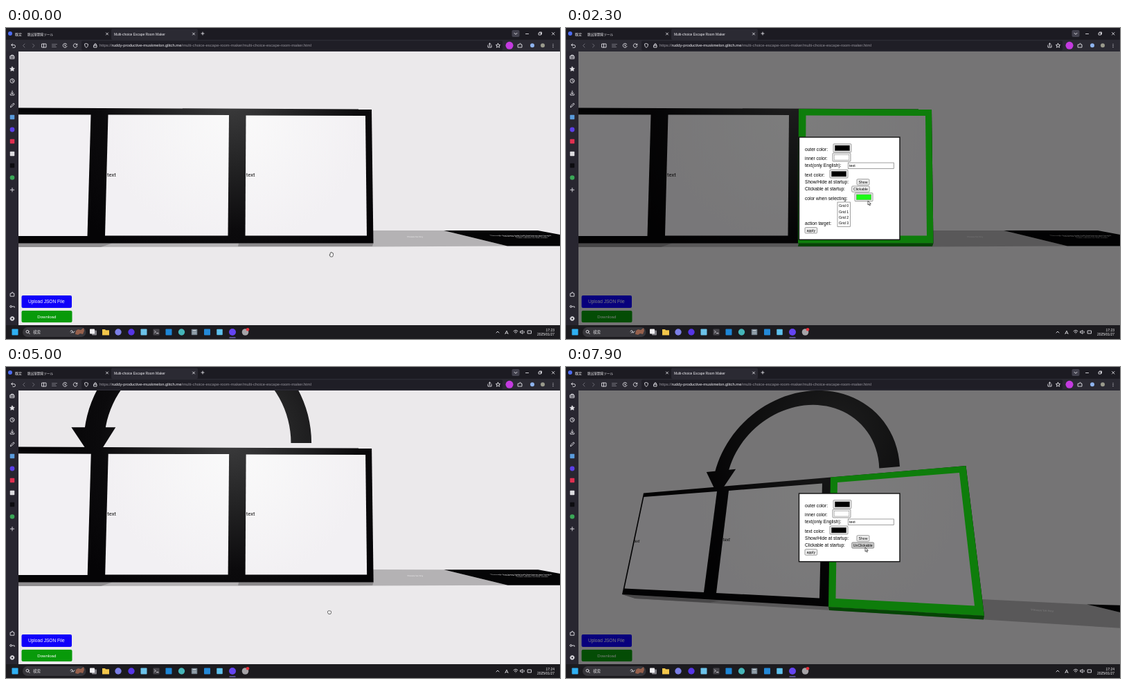
These frames come from a looping animation (800x450 px, 8 s). An HTML page:

```html
<!DOCTYPE html>
<html lang="en">
<head>
<meta charset="utf-8">
<title>Escape room editor</title>
<style>
html, body { margin: 0; width: 100%; height: 100%; overflow: hidden; background: #1c1b22; }
svg { display: block; width: 800px; height: 450px; }
text { font-family: "Liberation Sans", "Noto Sans CJK JP", "Noto Sans CJK", sans-serif; white-space: pre; }
.line { fill: none; stroke: #e4e3e8; stroke-width: .9; stroke-linecap: round; stroke-linejoin: round; }
.faint { stroke: #77757e; }
.ui { font: 6.6px "DejaVu Sans", sans-serif; }
.label { font: 7.6px Roboto, "Liberation Sans", sans-serif; fill: #111; }
.btn rect { fill: #efefef; stroke: #777; stroke-width: .7; }
.btn text { font-size: 5.2px; text-anchor: middle; }
</style>
</head>
<body>
<svg viewBox="0 0 800 450">
  <defs>
    <clipPath id="page"><rect x="18" y="34" width="782" height="396"/></clipPath>
    <radialGradient id="dark" gradientUnits="userSpaceOnUse" cx="0" cy="0" r="270">
      <stop offset="0" stop-color="#3c3c3d"/><stop offset=".35" stop-color="#232324"/>
      <stop offset=".7" stop-color="#0b0a0c"/><stop offset="1" stop-color="#050406"/>
    </radialGradient>
    <radialGradient id="light" gradientUnits="userSpaceOnUse" cx="0" cy="0" r="190">
      <stop offset="0" stop-color="#fafafa"/><stop offset="1" stop-color="#f2f0f3"/>
    </radialGradient>
  </defs>

  <g clip-path="url(#page)">
    <rect x="18" y="34" width="782" height="396" fill="#ebe9eb"/>
    <g id="scene"></g>
    <g class="ui" fill="#fff" text-anchor="middle">
      <rect x="22.5" y="387" width="72.5" height="18" rx="2" fill="#1000fa"/>
      <text x="58.3" y="398.2">Upload JSON File</text>
      <rect x="22.5" y="409" width="73" height="17" rx="2" fill="#089a0a"/>
      <text x="58.8" y="420" font-size="6.1">Download</text>
    </g>
    <rect id="dim" x="18" y="34" width="782" height="396" opacity=".5"/>
  </g>

  <g id="modal" class="ui">
    <rect id="box" x="336.5" width="145.5" fill="#fff" stroke="#111" stroke-width="1.4"/>
    <g id="fields">
      <text x="345" y="203">outer color:</text>
      <text x="345" y="216.3">inner color:</text>
      <text x="345" y="226.3">text(only English):</text>
      <rect x="407.3" y="220" width="66" height="8.4" fill="#fff" stroke="#777" stroke-width=".7"/>
      <text x="409" y="226.2" font-size="5.2" style="font-family:'Liberation Sans',sans-serif;font-size:5.4px">text</text>
      <text x="345" y="240">text color:</text>
      <text x="345" y="250">Show/Hide at startup:</text>
      <text x="345" y="260">Clickable at startup:</text>
    </g>
    <g id="extra">
      <text x="345" y="248.5">color when selecting:</text>
      <text x="345" y="284.6">action target:</text>
      <rect x="392" y="252" width="18.5" height="35.3" fill="#fff" stroke="#777" stroke-width=".7"/>
      <rect id="pick" x="392.5" y="252.7" width="17.5" height="8.3" fill="#cecece"/>
    </g>
    <g id="apply" class="btn"></g>
  </g>

  <g id="chrome">
    <rect width="800" height="17" fill="#1c1b22"/>
    <rect y="17" width="800" height="17" fill="#2b2a33"/>
    <rect x="152" y="1.5" width="125" height="15.5" rx="2" fill="#2b2a33"/>
    <rect x="109" y="18.5" width="608" height="14" rx="2" fill="#1f1e26"/>
    <rect y="34" width="18" height="396" fill="#282630"/>
    <rect y="430" width="800" height="20" fill="#1c1b1f"/>
    <g fill="#f2f1f5" font-size="4.95">
      <text x="13" y="10.5">既定</text>
      <text x="31" y="10.6" font-size="4.65">脱出室開発ツール</text>
      <text x="156" y="10.6">Multi-choice Escape Room Maker</text>
      <text x="135" y="27.4" font-size="5.89" fill="#96949c">https://<tspan fill="#f5f4f8">ruddy-productive-muskmelon.glitch.me</tspan>/multi-choice-escape-room-maker/multi-choice-escape-room-maker.html</text>
    </g>
    <rect x="730.5" y="3" width="11" height="10" rx="2" fill="#42414d"/>
    <g class="line">
      <path d="M144.5 7l3 3m0-3l-3 3M269.5 7l3 3m0-3l-3 3M282 8h4m-2-2v4M734 7.3l2 2 2-2M750.5 8.5h4M769.5 7h3v3h-3zm1-1h3v3M788.5 6.5l3.5 3.5m0-3.5l-3.5 3.5"/>
      <path d="M8 24.5h3.5a2 2 0 0 1 0 4H10M9.5 22.7L7.7 24.5l1.8 1.8"/>
      <path class="faint" d="M27 23l-2.5 2.5 2.5 2.5M38.5 23l2.5 2.5-2.5 2.5M66.5 23.5h7m-7 2h5m-5 2h6"/>
      <path d="M52 23h6v5h-6zm2.5 0v5M87.8 23.7a3 3 0 1 0 .2 2.8M85 24v1.7h1.5M102.5 24a2.8 2.8 0 1 0 .3 2.2m0-3.2v1.6h-1.7"/>
      <path d="M116 22.5l2.5 1q0 3.5-2.5 5-2.5-1.5-2.5-5zM127 25h4v3h-4zm.7 0v-1a1.3 1.3 0 0 1 2.6 0v1"/>
      <path d="M696 25v3h5v-3m-2.5 1.5V22m-1.5 1.5l1.5-1.5 1.5 1.5M710.5 22.3l.9 2 2.2.2-1.6 1.5.5 2.2-2-1.2-2 1.2.5-2.2-1.6-1.5 2.2-.2zM739.5 24h2q0-1.7 1-1.7t1 1.7h1.5v4h-5.5z"/>
      <path d="M790 23.2v.1m0 2.1v.1m0 2.1v.1" stroke-width="1.1"/>
    </g>
    <g class="line">
      <path d="M6.2 40.5h5.6v4H6.2zm1.4 0v-1.4h2.8v1.4M6.2 42.5h5.6"/>
      <path d="M9 56.2l1 2 2.2.2-1.6 1.6.5 2.2L9 61l-2.1 1.2.5-2.2-1.6-1.6 2.2-.2z" fill="#e4e3e8"/>
      <path d="M9 74.7v2l1.3.8M12 76.5a3 3 0 1 0-6 0 3 3 0 0 0 6 0M9 91v4.5m-1.8-1.7L9 95.5l1.8-1.7M6.3 95.5v1.6h5.4v-1.6M6.5 114.4l.5-1.8 3.8-3.8 1.3 1.3-3.8 3.8zM9 231.5v5.4m-2.7-2.7h5.4"/>
      <path d="M6.5 384h1.7q0-1.8 1-1.8t1 1.8h1.6v4.2H6.5zM8.5 403a1.4 1.4 0 1 0-2.8 0 1.4 1.4 0 0 0 2.8 0h3.7v1.4"/>
      <circle cx="9" cy="420.5" r="2" stroke-width="1.6"/>
      <circle cx="9" cy="420.5" r="3" stroke-dasharray="1 1.35"/>
    </g>
    <rect x="24" y="433" width="91.5" height="14" rx="7" fill="#37363b"/>
    <circle cx="31" cy="439.3" r="2" class="line"/><path class="line" d="M32.6 440.9l1.6 1.7"/>
    <text x="39" y="442" font-size="5.5" fill="#d8d7da">検索</text>
    <path class="line" d="M93 439q2-3 3 0t3 0m-5 2q2-2 3 0"/>
    <path d="M100 443l1-5 3-2 4 1 4-3 1 4-2 5-4-1-3 2z" fill="#96604c"/>
    <path d="M322.5 448h9" stroke="#8f7cf0" stroke-width="1"/>
    <path class="line" d="M708 441l2-2 2 2M733 438.7q3-3 6 0m-4.7 1.5q1.7-1.7 3.4 0m-1.7 1.6v.1M743 438.8h1.2l1.7-1.5v5.2l-1.7-1.5H743zm5 0q1 1.2 0 2.4M753.5 438h5v4h-5z"/>
    <g fill="#f2f1f4" font-size="5">
      <text x="720.2" y="442.7" font-size="8">A</text>
      <text id="clock" x="792" y="438.6" text-anchor="end"></text>
      <text x="792" y="445.2" text-anchor="end">2025/01/27</text>
    </g>
  </g>

  <g id="cursor" stroke="#222" stroke-width=".7" fill="#fff" stroke-linejoin="round">
    <path id="arrow" d="M0 0v6l1.4-1.2 1 2.2 1-.5-1-2.1h1.9z"/>
    <path id="hand" d="M-3 0l1.1.3v-2.6q.6-.8 1 0v-.9q.6-.8 1.1 0v.3q.7-.7 1.1 0v.7q.7-.5 1.1.1v3l-.9 2.1h-3z"/>
    <path id="fist" d="M-2.4-1.2q.6-1.4 1.4-.8.8-.7 1.4 0 .8-.5 1.3.2.8 0 .8 1v1.5l-.8 1.6h-3l-1.1-1.8z"/>
  </g>
</svg>

<script>
const NS = "http://www.w3.org/2000/svg";
const $ = id => document.getElementById(id);
const LOOP = 8000;

function add(parent, tag, attrs, text) {
  const el = document.createElementNS(NS, tag);
  for (const k in attrs) el.setAttribute(k, attrs[k]);
  if (text) el.textContent = text;
  parent.appendChild(el);
  return el;
}
const show = (el, on) => el.setAttribute("visibility", on ? "visible" : "hidden");
const mix = (a, b, k) => a.map((v, i) => v + (b[i] - v) * k);
const nums = s => s.split(/[ ,]+/).map(Number);

// Every part of the room has its place before and after the camera turn.
const scene = $("scene");
const parts = [];
function poly(fill, before, after) {
  const el = add(scene, "polygon", { fill });
  parts.push({ el, a: nums(before), b: nums(after), attr: "points", wrap: v => v.join(" ") });
  return el;
}
function label(text, before, after, attrs = { class: "label" }) {
  const el = add(scene, "text", attrs, text);
  parts.push({ el, a: nums(before), b: nums(after), attr: "transform", wrap: v => `matrix(${v})` });
}

const ring = add(scene, "path", { fill: "url(#dark)" });
poly("#b4b2b4", "525,293 632,293 724,315.5 530,316.5 -78,317 -78,311",
  "600,336 752,343.5 931,386 604,365.5 100,335 81,329");
poly("#050506", "632,293 768,293 890,315.5 724,315.5", "752,343.5 950,349 1100,395 931,386");
poly("#8f8d8f", "-78,311 153,311.5 137,317 -78,317", "81,329 222,338 208,341 100,335");
const under = poly("#8b898b", "336,311.5 530.5,311.5 529,316 335,316", "379,347 604,360 603,365.5 380,352");
poly("url(#dark)", "-78,115 528,117.5 530.5,311.5 -78,311.5", "112,182.5 577.5,143 604,360 81,329");
const frame = poly("#1cfb16", "336,117 528,117.5 530.5,311.5 335,311.5", "382,159.5 577.5,143 604,360 379,347");
poly("url(#light)", "-68,125 122.5,125.5 117.5,301 -72,301", "112.5,188 218,180 199,326 84.5,320.5");
poly("url(#light)", "147.5,125.5 322,126 320.5,300.5 143,300.5", "235,179 370,168.5 366,334.5 217,327");
poly("url(#light)", "346.5,126.5 519,127 521,300.5 345.5,300.5", "392,167 568,153 590,345.5 389.5,335");
label("text", "1 0 0 1 -70 215", ".64 -.01 -.14 .8 98 254");
label("text", "1 0 0 1 146 215", ".8 0 -.1 .87 226.5 251.5");
label("text", "1 0 0 1 346.7 215", ".94 0 0 1 391.6 248.5");
const tiny = { fill: "#f4f3f4", "font-size": 4, "text-anchor": "middle" };
label("Please be tiny", ".9 0 .3 .65 591 303.3", "1.3 .08 .3 1 688 353.5", tiny);
["Through the long dark hall the keys are found", "Look for a door and the clues on it", "Then return to the room"]
  .forEach((s, i) => label(s, `1.1 0 .8 .5 ${744 + i * 8} ${300.6 + i * 1.6}`, `1.3 .08 .3 1 ${990 + i * 8} 362`, tiny));

// The curved arrow lies on a plane; rows hold the x, y and depth terms of its projection.
const planeA = [164.5, 0, 276.5, 0, -164.5, 110, 0, 0, 1];
const planeB = [96.5, 39.2, 332, -29, -117.2, 157, -.111, .0955, 1];
function drawRing(k) {
  const m = mix(planeA, planeB, k);
  const at = (u, v) => {
    const w = m[6] * u + m[7] * v + m[8];
    return [(m[0] * u + m[1] * v + m[2]) / w, (m[3] * u + m[4] * v + m[5]) / w].map(n => n.toFixed(2));
  };
  const arc = (r, from, to) => Array.from({ length: 49 }, (_, i) => {
    const q = from + (to - from) * i / 48;
    return at(r * Math.cos(q), r * Math.sin(q));
  });
  const end = Math.PI - .12;
  const body = [...arc(1, 0, end), ...arc(.82, end, 0)];
  const head = [at(-1.109, .14), at(-.909, -.16), at(-.72, .14)];
  ring.setAttribute("d", `M${body.join("L")}ZM${head.join("L")}Z`);
}

// Dialog controls
const fields = $("fields"), extra = $("extra");
function swatch(parent, x, y, fill) {
  add(parent, "rect", { x, y, width: 26, height: 12, rx: 1, fill: "#efefef", stroke: "#777", "stroke-width": .7 });
  add(parent, "rect", { x: x + 2.2, y: y + 2.2, width: 21.6, height: 7.8, fill, stroke: "#777", "stroke-width": .4 });
}
function button(parent, x, y, width, text) {
  const g = add(parent, "g", { class: "btn" });
  const rect = add(g, "rect", { x, y, width, height: 8.4, rx: 1.3 });
  const caption = add(g, "text", { x: x + width / 2, y: y + 6.1 }, text);
  caption.style.fontFamily = "'Liberation Sans', sans-serif";
  return { g, rect };
}
swatch(fields, 386, 192.7, "#000");
swatch(fields, 385, 206, "#fff");
swatch(fields, 381, 230, "#000");
swatch(extra, 417, 238.7, "#1cfb16");
button(fields, 420, 243.7, 18, "Show");
const locked = button(fields, 412.7, 253.8, 32, "UnClickable");
const open = button(fields, 412.7, 253.8, 25.5, "Clickable");
button($("apply"), 345, 263.8, 17.6, "apply");
for (let i = 0; i < 4; i++) {
  const row = add(extra, "text", { x: 394, y: 259.2 + i * 8.3 }, "Grid " + i);
  row.style.font = "5.2px 'Liberation Sans', sans-serif";
}

// Plain marks for toolbar, side bar and task bar
const chrome = $("chrome");
const dot = (cx, cy, r, fill) => add(chrome, "circle", { cx, cy, r, fill });
const tile = (x, y, s, fill) => add(chrome, "rect", { x: x - s / 2, y: y - s / 2, width: s, height: s, rx: .8, fill });
dot(6, 8, 3, "#4d6cf5");
dot(727, 25.3, 5.5, "#c43be0");
dot(760, 25.3, 3, "#8fb4ee");
dot(775, 25.3, 3, "#9a9a8c");
tile(9, 129, 6.5, "#5a9bdc");
dot(9, 147, 3.4, "#5b3fe8");
tile(9, 164, 6.5, "#e02f50");
tile(9, 182, 6.5, "#dddce0");
tile(9, 199, 6.5, "#0d0c10");
dot(9, 216.5, 3.3, "#3aa757");
tile(13, 440, 9, "#2fb0f2");
tile(127.5, 441, 7, "#85848a");
tile(124.5, 439, 7, "#f0eff2");
add(chrome, "path", { d: "M139 436h4l1 1.2h5v7.3h-10z", fill: "#f3c64a" });
dot(162, 440, 4.7, "#7b7fe6");
dot(181, 440, 4.7, "#5636e6");
tile(199, 440, 9, "#6cc3ea");
tile(217, 440, 9, "#47464c");
add(chrome, "path", { class: "line", d: "M214.5 438l1.6 1.6-1.6 1.6m3 .4h2.5" });
tile(235, 440, 9, "#1d86d6");
dot(253.5, 440, 4.7, "#45b5b8");
tile(272, 440, 8.5, "#73828e");
add(chrome, "path", { d: "M269.5 437.7h5m-5 2.5h1m1 0h1m1 0h1m-5 2h1m1 0h1m1 0h1", stroke: "#e8eef2" });
tile(290.5, 440, 9, "#2489d8");
tile(308.5, 440, 8.5, "#5dc1ec");
dot(327, 440, 5, "#6444f2");
dot(345.5, 440, 4.8, "#a5a4a8");
dot(349, 436.3, 2.3, "#e8323c");

// Pointer path: time, x, y
const path = [
  [0, 470, 328], [250, 468, 324], [700, 438, 268], [1000, 430, 262], [1300, 428, 262], [1750, 428, 262],
  [2300, 436, 250], [3000, 402, 262], [3400, 394, 255], [3700, 394, 255], [4150, 353, 291], [4350, 353, 291],
  [4800, 460, 351], [5000, 467, 355], [5400, 428, 326], [5800, 428, 326], [6500, 478, 332], [7200, 526, 336],
  [7500, 450, 298], [7800, 432, 261], [8000, 432, 261]
];
function pointer(t) {
  const i = path.findIndex(p => p[0] > t);
  const [p, q] = [path[i - 1], path[i]];
  const s = (t - p[0]) / (q[0] - p[0]);
  return mix(p, q, s * s * (3 - 2 * s)).slice(1);
}

function draw(t) {
  const within = (a, b) => t >= a && t < b;
  const turn = Math.min(1, Math.max(0, (t - 5000) / 400));
  for (const p of parts) p.el.setAttribute(p.attr, p.wrap(mix(p.a, p.b, turn)));
  drawRing(turn);
  show(ring, t >= 4300);
  for (const [id, a, b] of [["dark", [325, 105], [390, 95]], ["light", [330, 125], [380, 175]]]) {
    const [x, y] = mix(a, b, turn);
    $(id).setAttribute("cx", x);
    $(id).setAttribute("cy", y);
  }

  const lit = within(400, 4600) || t >= 5500;
  show(frame, lit);
  under.setAttribute("fill", lit ? "#0b8a0b" : "#8b898b");

  const modal = within(800, 4300) || t >= 7500;
  const long = within(1700, 4300);
  $("modal").style.display = modal ? "" : "none";
  show($("dim"), modal);
  $("box").setAttribute("y", long ? 158 : 183);
  $("box").setAttribute("height", long ? 148.3 : 98.6);
  fields.setAttribute("transform", `translate(0 ${long ? -25 : 0})`);
  $("apply").setAttribute("transform", `translate(0 ${long ? 24.8 : 0})`);
  extra.style.display = long ? "" : "none";
  show(locked.g, !long);
  show(open.g, long);
  show($("pick"), within(3600, 4300));
  locked.rect.style.fill = t >= 7750 ? "#c8c8c8" : "";

  const [x, y] = pointer(t);
  $("cursor").setAttribute("transform", `translate(${x} ${y})`);
  show($("arrow"), modal);
  show($("hand"), t < 800);
  show($("fist"), within(4300, 7500));
  $("clock").textContent = t < 3000 ? "17:23" : "17:24";
}

const start = performance.now();
function tick() {
  draw((performance.now() - start) % LOOP);
  requestAnimationFrame(tick);
}
tick();
</script>
</body>
</html>
```
